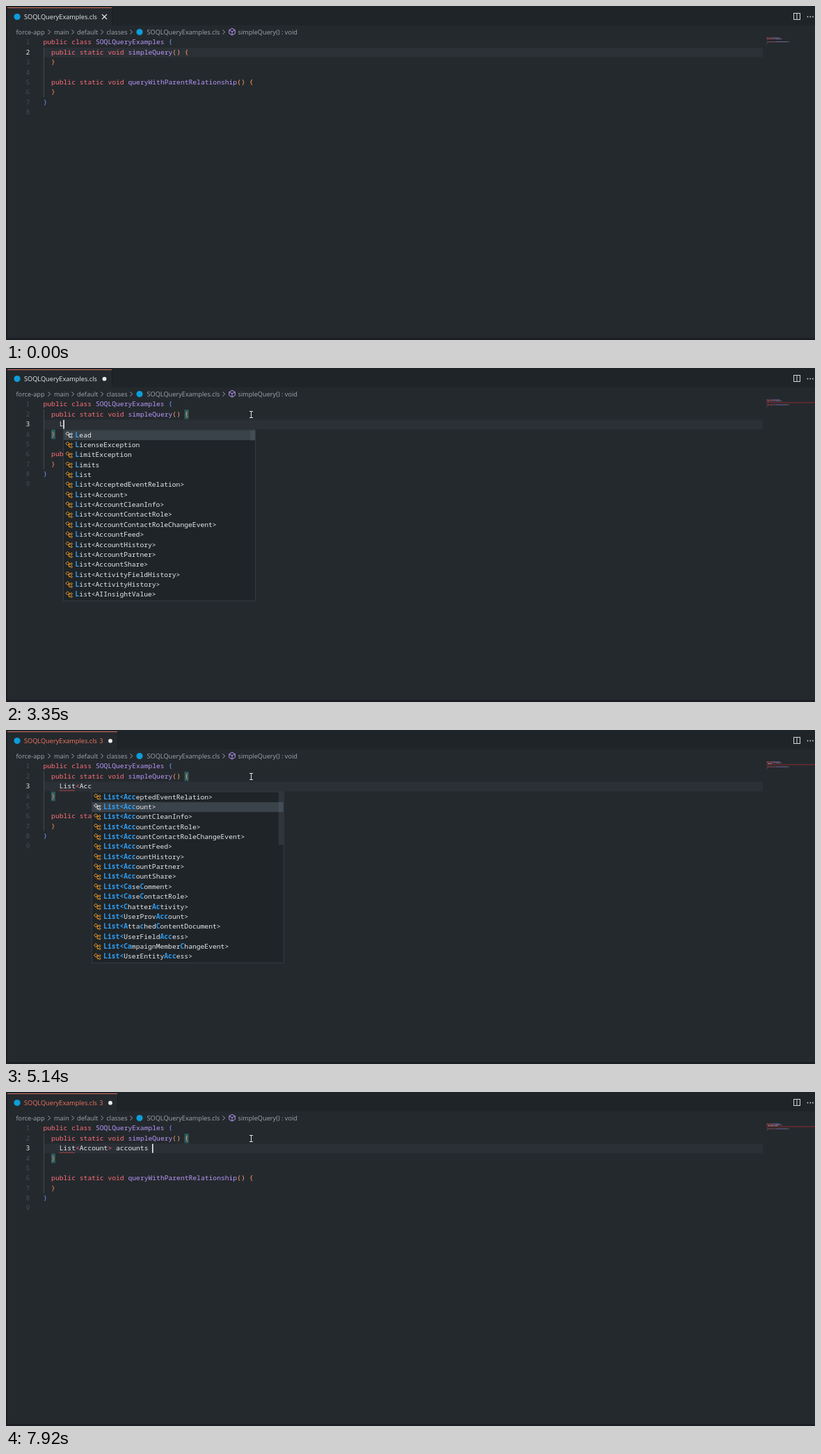
Recreate the animation shown at these times as an HTML page with a canvas. Size 1163x481 px, loop 8 s.

```html
<!DOCTYPE html>
<html lang="en">
<head>
<meta charset="utf-8">
<title>Code editor</title>
<style>
html, body { margin: 0; width: 100%; height: 100%; overflow: hidden; background: #24292e; }
canvas { display: block; }
</style>
</head>
<body>
<canvas id="stage" width="1163" height="481"></canvas>
<script>
const ctx = document.getElementById('stage').getContext('2d');
const LOOP = 8000, CW = 5.808, LH = 14.37, LEFT = 53.5, TOP = 45;
const MONO = '9.68px "Noto Sans Mono", monospace';
const UI = '9.2px "Open Sans", "Noto Sans", sans-serif';
const C = {
  bg: '#24292d', dark: '#1f2428', edge: '#1b1f23', line: '#2b3036',
  red: '#ff6f78', purple: '#b898f8', orange: '#ffa368', closer: '#ff8a60', blue: '#6c94f8',
  text: '#e8ebee', crumb: '#a0a7ae', dim: '#444d56', match: '#2f9df0',
  icon: '#ee9d28', error: '#f4735f', badge: '#0d9dda'
};

const BASE = [
  'public class SOQLQueryExamples {',
  '  public static void simpleQuery() {',
  '  }',
  '',
  '  public static void queryWithParentRelationship() {',
  '  }',
  '}',
  ''
];

const wrap = s => s.split(' ').map(n => `List<${n}>`);
const lists = wrap('AcceptedEventRelation Account AccountCleanInfo AccountContactRole ' +
  'AccountContactRoleChangeEvent AccountFeed AccountHistory AccountPartner AccountShare ' +
  'ActivityFieldHistory ActivityHistory AIInsightValue AIRecordInsight ' +
  'AlternativePaymentMethod ApexEmailNotification ApexLog AppUsageAssignment');
const typesL = 'Lead LicenseException LimitException Limits List'.split(' ').concat(lists);
const typesAcc = lists.slice(0, 9).concat(
  '~List<Ca~se~C~omment>', '~List<Ca~se~C~ontactRole>', '~List<C~hatter~Ac~tivity>',
  wrap('UserProvAccount AttachedContentDocument UserFieldAccess'),
  '~List<Ca~mpaignMember~C~hangeEvent>', 'List<UserEntityAccess>');
const typesA = ('AccessLevel AccessType Account AccountHistory ApexBaseClass AsyncException ' +
  'AsyncInfo AsyncOptions Attachment AppExchangeTrialTemplate AppExchangeUserPerms ' +
  'AppLauncher AssertException ApexBaseException auraHandledException ' +
  'Approval Asset Aura').split(' ');

// time, typed text, popup items, selected row, scrollbar thumb height
const DECL = 'List<Account> ';
const STEPS = [
  [2760, ''],
  [3240, 'L'],
  [3300, 'L', typesL, 0, 15],
  [3430, 'Li', typesL, 0, 15],
  [3560, 'Lis', typesL, 0, 15],
  [3640, 'List', typesL, 0, 15],
  [3980, 'List<'],
  [4100, 'List<', lists, 0, 15],
  [4600, 'List<Ac', typesAcc, 0, 76],
  [4650, 'List<Acc', typesAcc, 0, 76],
  [5140, 'List<Acc', typesAcc, 1, 76],
  [5430, 'List<Account>'],
  [5580, DECL],
  [6160, DECL + 'a'],
  [6220, DECL + 'a', typesA, 0, 15],
  [6360, DECL + 'ac', typesA, 0],
  [6470, DECL + 'acc', typesA, 0],
  [6650, DECL + 'acco', typesA, 0],
  [6760, DECL + 'accou', typesA, 0],
  [6940, DECL + 'accoun', typesA, 0],
  [7070, DECL + 'account', typesA, 0],
  [7210, DECL + 'accounts', typesA, 0],
  [7920, DECL + 'accounts ']
];

// time, x, y of the pointer
const PATH = [
  [530, 560, 488], [800, 430, 260], [1050, 352, 130], [1270, 328, 103], [1370, 328, 103],
  [1410, 303, 94.5], [1610, 268, 72], [1900, 268, 71], [2190, 352, 67.5]
];

const colX = c => LEFT + c * CW;
const rowY = r => TOP + r * LH;

function rect(x, y, w, h, color) {
  ctx.fillStyle = color;
  ctx.fillRect(x, y, w, h);
}
function text(s, x, y, color, font) {
  ctx.font = font;
  ctx.fillStyle = color;
  ctx.fillText(s, x, y);
}
function disc(x, y, r, color) {
  ctx.fillStyle = color;
  ctx.beginPath();
  ctx.arc(x, y, r, 0, 7);
  ctx.fill();
}
function stroke(color, width, ...lines) {
  ctx.strokeStyle = color;
  ctx.lineWidth = width;
  ctx.beginPath();
  for (const pts of lines)
    for (let i = 0; i < pts.length; i += 2)
      i ? ctx.lineTo(pts[i], pts[i + 1]) : ctx.moveTo(pts[i], pts[i + 1]);
  ctx.stroke();
}
function squiggle(x, y, w) {
  const pts = [];
  for (let i = 0; i * 2 <= w; i++) pts.push(x + i * 2, y + (i % 2 ? -1 : 1));
  stroke('#e5484d', 0.8, pts);
}

function drawFrame(t) {
  rect(0, 0, 1163, 481, C.bg);
  rect(0, 0, 1163, 28, C.dark);
  const failed = t >= 3500, edited = t >= 2760;
  const right = failed ? 160 : 152;
  rect(2, 2, right - 2, 26, C.bg);
  rect(2, 2, right - 2, 1, '#d8735f');
  rect(right, 2, 1, 26, C.edge);
  rect(0, 0, 2, 481, C.edge);
  rect(0, 478, 1163, 3, C.edge);

  disc(16, 15.5, 4.6, C.badge);
  text('SOQLQueryExamples.cls', 26, 19, failed ? C.error : C.text, UI);
  if (failed) text(t < 4650 ? '6' : '3', 134.3, 19, C.error, UI);
  if (edited) disc(failed ? 150 : 141.5, 15.7, 2.9, C.text);
  else stroke(C.text, 1.1, [138, 12, 145, 19], [145, 12, 138, 19]);

  ctx.strokeStyle = '#d1d5da';
  ctx.lineWidth = 1;
  ctx.strokeRect(1132.5, 10.5, 9, 9);
  rect(1136.5, 10.5, 1, 9, '#d1d5da');
  for (const x of [1152.5, 1156.3, 1160]) disc(x, 15.5, 0.9, '#d1d5da');

  const crumbs = [['force-app', 14.5], ['main', 69], ['default', 102], ['classes', 144.5],
    ['SOQLQueryExamples.cls', 202.5], ['simpleQuery() : void', 333.5]];
  for (const [s, x] of crumbs) text(s, x, 41, C.crumb, UI);
  for (const x of [62, 96, 138, 180, 313])
    stroke(C.crumb, 1, [x - 1.5, 34.3, x + 1.7, 37.5, x - 1.5, 40.7]);
  disc(192, 37.5, 4.6, C.badge);
  stroke(C.purple, 1,
    [325, 32.3, 329.3, 34.6, 329.3, 39.6, 325, 42, 320.8, 39.6, 320.8, 34.6, 325, 32.3],
    [320.8, 34.6, 325, 36.9, 329.3, 34.6], [325, 36.9, 325, 42]);
}

function tokens(line, row) {
  return [...line.matchAll(/\w+|\S/g)].map(m => {
    const s = m[0];
    let color = C.purple;
    if (/^(public|class|static|void)$/.test(s)) color = C.red;
    else if (/\W/.test(s)) {
      if (row === 0 || m.index === 0) color = C.blue;
      else color = s === '}' ? C.closer : C.orange;
    }
    return [s, m.index, color];
  });
}

function typedTokens(s) {
  return [...s.matchAll(/\w+|\S/g)].map(m =>
    [m[0], m.index + 4, /\w/.test(m[0]) ? C.text : C.red]);
}

function drawCode(t, step) {
  const lines = BASE.slice();
  if (step) lines.splice(2, 0, '    ' + step[1]);
  const active = step ? 2 : 1;
  rect(54, rowY(active) + 0.6, 1034, LH - 0.4, C.line);
  rect(54, rowY(1), 1, LH * (step ? 6 : 5), '#444a51');
  if (t >= 1900) {
    rect(colX(35) - 0.2, rowY(1) + 0.7, 6, 13.5, '#2c5e60');
    rect(colX(2) - 0.2, rowY(step ? 3 : 2) + 0.7, 6, 13.5, '#2c5e60');
  }
  lines.forEach((line, r) => {
    const base = rowY(r) + 10.4;
    text(r + 1, 28.6, base, r === active ? C.text : C.dim, MONO);
    const parts = step && r === 2 ? typedTokens(step[1]) : tokens(line, r);
    for (const [s, c, color] of parts) {
      text(s, colX(c), base, color, '500 ' + MONO);
      ctx.globalAlpha = 0.55;
      rect(1093 + c * 0.63, 45.4 + r * 1.42, s.length * 0.63, 1, color);
      ctx.globalAlpha = 1;
    }
  });
  const broken = t >= 4100 && t < 4650;
  if (t >= 3350) rect(1093, 49.3, 70, 1.2, broken ? '#b3262e' : '#7c2b32');
  if (t >= 3560) squiggle(colX(4), rowY(3) - 1, CW * Math.min(4, step[1].length));
  if (broken) {
    rect(1093, 55, 70, 1, '#b3262e');
    squiggle(LEFT, rowY(9) - 1, 6);
  }
}

function drawCaret(t, step) {
  if (t < 1900) return;
  const since = step ? STEPS.find(s => s[1] === step[1])[0] : 1900;
  if ((t - since) % 1000 >= 490) return;
  const c = step ? 4 + step[1].length : 36;
  rect(colX(c) - 0.3, rowY(step ? 2 : 1) + 1, 1.6, 13, '#f0f2f4');
}

// Letters of the label that match the pattern in order, or null if some are missing
function fuzzy(label, pattern) {
  const hits = new Set();
  let i = 0;
  for (const ch of pattern.toLowerCase()) {
    i = label.toLowerCase().indexOf(ch, i);
    if (i < 0) return null;
    hits.add(i++);
  }
  return hits;
}

function matched(item, pattern) {
  if (!item.includes('~')) return { label: item, hits: fuzzy(item, pattern) };
  const hits = new Set();
  let label = '';
  item.split('~').forEach((part, k) => {
    for (const ch of part) {
      if (k % 2) hits.add(label.length);
      label += ch;
    }
  });
  return { label, hits };
}

function drawIcon(label, x, y, selected) {
  const color = selected ? '#f0f2f4' : C.icon;
  if (label === 'AppLauncher') return text('{}', x - 1, y + 3.3, C.text, MONO);
  ctx.lineWidth = 1;
  ctx.strokeStyle = label === 'auraHandledException' ? C.text : color;
  if (label === 'auraHandledException') return ctx.strokeRect(x + 0.5, y - 4, 9, 9);
  const diamond = (cx, cy, r) => [cx - r, cy, cx, cy - r, cx + r, cy, cx, cy + r, cx - r, cy];
  stroke(color, 1, diamond(x + 3, y - 1.7, 2.6), diamond(x + 8.5, y - 1, 1.5),
    diamond(x + 8.5, y + 3.2, 1.5), [x + 4.5, y - 0.8, x + 7, y - 0.8],
    [x + 5, y - 0.8, x + 5, y + 3.2, x + 7, y + 3.2]);
}

function drawPopup(step) {
  const [, typed, items, selected, thumb] = step;
  if (!items) return;
  const pattern = typed.replace(DECL, '');
  const rows = items.map(s => matched(s, pattern)).filter(r => r.hits).slice(0, 17);
  const x = colX(4 + typed.length), y = 89, w = 276;
  const h = rows.length * LH + (rows.length === 17 ? 2 : 1);
  rect(x - 0.5, y - 0.5, w + 1, h + 1, '#363c43');
  rect(x + 0.5, y + 0.5, w - 1, h - 1, C.dark);
  rect(x + 0.5, y + 0.5 + selected * LH, w - 1, LH, '#3a424a');
  if (thumb) rect(x + w - 7.5, y + 0.5, 7, thumb, 'rgba(106,115,125,.22)');
  rows.forEach(({ label, hits }, r) => {
    const cy = y + 7.2 + r * LH;
    drawIcon(label, x + 3, cy, r === selected);
    for (let i = 0; i < label.length;) {
      let j = i + 1;
      while (j < label.length && hits.has(j) === hits.has(i)) j++;
      text(label.slice(i, j), x + 17 + i * CW, cy + 3.3,
        hits.has(i) ? C.match : C.text, (hits.has(i) ? '700 ' : '500 ') + MONO);
      i = j;
    }
    if (label === 'auraHandledException')
      text('AuraHandledException', x + 169, cy + 3, '#9aa1a8',
        '500 8.28px "Noto Sans Mono", monospace');
  });
}

function drawPointer(t) {
  if (t < PATH[0][0]) return;
  let [, x, y] = PATH[PATH.length - 1];
  const k = PATH.findIndex(p => p[0] > t);
  if (k > 0) {
    const [a, b] = [PATH[k - 1], PATH[k]];
    const u = (t - a[0]) / (b[0] - a[0]);
    x = a[1] + (b[1] - a[1]) * u;
    y = a[2] + (b[2] - a[2]) * u;
  }
  x = Math.round(x) + 0.5;
  y = Math.floor(y);
  stroke('#dfe2e5', 1, [x, y - 4.5, x, y + 4.5],
    [x - 2.5, y - 4.5, x + 2.5, y - 4.5], [x - 2.5, y + 4.5, x + 2.5, y + 4.5]);
}

function draw() {
  const t = performance.now() % LOOP;
  const step = STEPS.filter(s => s[0] <= t).pop();
  drawFrame(t);
  drawCode(t, step);
  drawCaret(t, step);
  if (step) drawPopup(step);
  drawPointer(t);
  requestAnimationFrame(draw);
}
draw();
</script>
</body>
</html>
```
